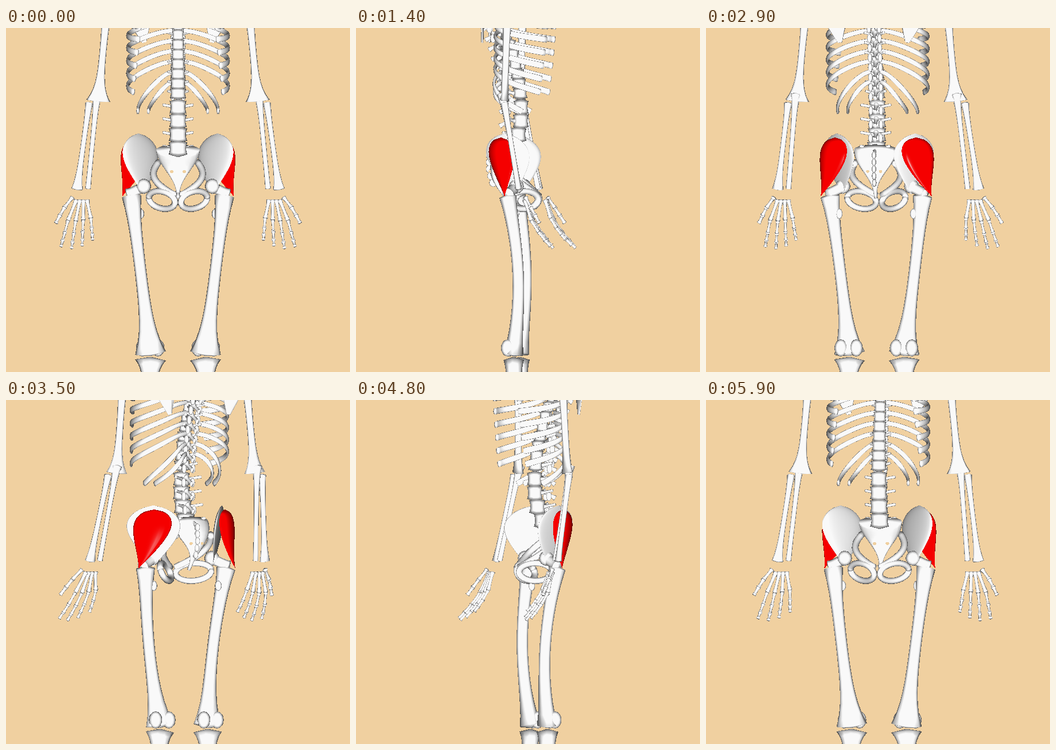
These frames come from a looping animation (600x600 px, 6000 ms). An HTML page with a canvas:

```html
<!DOCTYPE html>
<html lang="en">
<head>
<meta charset="utf-8">
<title>Rotating skeleton</title>
<style>
  html, body { margin: 0; width: 100%; height: 100%; overflow: hidden; background: #f0d0a0; }
  canvas { display: block; }
</style>
</head>
<body>
<canvas id="stage" width="600" height="600"></canvas>
<script>
const SIZE = 600, BONE = 0, MUSCLE = 1, HOLE = 2;
const Y = [0, 1, 0], Z = [0, 0, 1];
const { PI, sin, cos, min, max, abs } = Math;
const verts = [], tris = [];
let side = 1; // x is measured from the turning axis and mirrored for the other half

const add = (a, b, k = 1) => [a[0] + b[0] * k, a[1] + b[1] * k, a[2] + b[2] * k];
const cross = (a, b) => [a[1] * b[2] - a[2] * b[1], a[2] * b[0] - a[0] * b[2], a[0] * b[1] - a[1] * b[0]];
const unit = a => { const l = Math.hypot(...a) || 1; return a.map(v => v / l); };
const mix = (a, b, t) => a + (b - a) * t;
const mix3 = (a, b, t) => a.map((v, i) => mix(v, b[i], t));
const steps = (n, f) => Array.from({ length: n + 1 }, (_, i) => f(i / n));
const ring = (n, f) => Array.from({ length: n }, (_, i) => f(cos(i / n * 2 * PI), sin(i / n * 2 * PI)));

// Joins closed rings into a smooth surface
function skin(rings, kind = BONE) {
  const n = rings[0].length, m = rings.length, base = verts.length;
  rings.forEach((r, i) => r.forEach((p, j) => {
    const along = add(rings[min(i + 1, m - 1)][j], rings[max(i - 1, 0)][j], -1);
    const around = add(r[(j + 1) % n], r[(j + n - 1) % n], -1);
    const [nx, ny, nz] = unit(cross(along, around));
    verts.push({ x: p[0] * side, y: p[1], z: p[2], nx: nx * side, ny, nz });
  }));
  for (let i = 0; i < m - 1; i++) for (let j = 0; j < n; j++) {
    const a = base + i * n + j, b = base + i * n + (j + 1) % n;
    tris.push([a, b, a + n, kind], [b, b + n, a + n, kind]);
  }
}

// Each point holds x, y, z and two radii
function tube(pts, ref = Z, n = 12) {
  const last = pts.length - 1;
  const dir = pts.map((p, i) => unit(add(pts[min(i + 1, last)], pts[max(i - 1, 0)], -1)));
  const rings = pts.map((p, i) => {
    const u = unit(cross(dir[i], ref)), w = cross(u, dir[i]);
    return ring(n, (c, s) => add(add(p, u, p[3] * c), w, p[4] * s));
  });
  const cap = (i, sign) => {
    const p = pts[i], tip = add(p, dir[i], sign * .3 * min(p[3], p[4]));
    return rings[i].map(q => add(tip, add(q, p, -1), .05));
  };
  skin([cap(0, -1), ...rings, cap(last, 1)]);
}

// A shaft of radius r that flares towards both ends and bows forward
function bone(a, b, r, startR, endR, bow = 0) {
  const pair = v => [v, v].flat().slice(0, 2);
  const [s, e] = [startR, endR].map(v => Array.isArray(v) ? v : pair(v));
  tube(steps(14, t => {
    const radius = i => r + (s[i] - r) * (1 - t) ** 7 + (e[i] - r) * t ** 7;
    const [x, y, z] = mix3(a, b, t);
    return [x, y, z + bow * sin(PI * t), radius(0), radius(1)];
  }));
}

const chain = (points, r) =>
  points.slice(1).forEach((q, i) => bone(mix3(points[i], q, .04), mix3(points[i], q, .96), r * .58, r, r * .9));

function blob(x, y, z, rx, ry, rz, kind) {
  skin(steps(8, t => {
    const a = mix(-1.55, 1.55, t), k = cos(a);
    return ring(12, (c, s) => [x + rx * k * c, y + ry * sin(a), z + rz * k * s]);
  }), kind);
}

// A leaf-shaped plate, widest near the top; angle turns its width from x towards z
function petal({ top, bottom, skew, half, center, angle, outer, inner, kind }) {
  const dx = cos(angle), dz = sin(angle);
  skin(steps(28, t => {
    const w = max(.02, sin(PI * t ** skew)), [cx, cz] = center(t);
    return ring(24, (c, s) => {
      const along = half * w * c, out = s * w * (s > 0 ? outer : inner);
      return [cx + along * dx + out * dz, mix(top, bottom, t), cz + along * dz - out * dx];
    });
  }), kind);
}

const spineZ = y => -12 - (y - 150) ** 2 * (y > 150 ? .004 : .00133);

function spine() {
  for (let i = 0, y = 210; i < 12; i++) {
    const lumbar = i < 4, gap = lumbar ? 24 : 17, z = spineZ(y), w = 16.5 - i * .6;
    tube(steps(6, t => {
      const r = w * (1 - .14 * sin(PI * t));
      return [0, y + gap * .88 * (t - .5), z, r, r * .9];
    }));
    bone([0, y - 3, z - 16], [0, y + 9, z - 37], 3, [5, 6], [3, 5]);
    for (side of [1, -1]) {
      bone([5, y, z - 11], [lumbar ? 26 : 17, y - 4, z - 24], 2.5, 4, 2.5);
      blob(9, y + 6, z - 23, 4, 8, 5);
    }
    side = 1;
    y -= gap;
  }
  // sacrum, its crest and openings
  tube(steps(14, t => {
    const w = 3 + 35 * (1 - t * t) ** 3;
    return [0, mix(212, 296, t), -38 - 20 * sin(PI * t), w, 2 + w * .33];
  }), Z, 20);
  for (let y = 222; y < 275; y += 12) blob(0, y, -67 + max(0, y - 250) * .3, 4, 7, 7);
  for (const x of [-11, 11]) blob(x, 250, -57, 4, 3.5, 12, HOLE);
}

function rib(top, fall, reach, sweep) {
  tube(steps(20, t => {
    const a = sweep * t;
    return [10 + reach * sin(a) ** .7, top + fall * t + 6 * sin(PI * t),
      -5 - 58 * cos(a) + 18 * (1 - t) ** 6, 2.6, 4 + 1.6 * t * reach / 78];
  }), Y);
}

function chest() {
  for (let k = 0; k < 7; k++) rib(58 - 18 * k, 54 - 5 * k, 78, 2.2 + .06 * k);
  rib(76, 70, 60, 1.6);
  rib(94, 52, 42, 1.5);
  tube([[66, -12, -72, 20, 2], [59, 25, -74, 4, 2]]); // shoulder blade tip
}

function arm() {
  bone([125, -20, -23], [139, 127, -27], 6, 9, [21, 8]);
  bone([155, 131, -25], [176, 281, 2], 4.5, 7, [10, 6]);
  bone([141, 115, -31], [157, 280, 1], 4.2, 9, 5);
  const curl = y => 13 + 49 * max(0, (y - 298) / 84) ** 1.7;
  for (let i = 0; i < 4; i++) {
    const arch = sin(i * .75), knuckle = [152 + 13.3 * i, 332 + 5 * arch], tip = [149 + 18.3 * i, 369 + 15 * arch];
    const joints = [0, .45, .77, 1].map(t => {
      const [x, y] = mix3(knuckle, tip, t);
      return [x, y, curl(y)];
    });
    chain([[159 + 6 * i, 299, 13], joints[0]], 4.8);
    chain(joints, 3.8);
  }
  chain([0, .4, .7, 1].map(t => [184 + 29 * t ** .8, 295 + 45 * t, 15 + 27 * t]), 4.5);
}

function leg() {
  bone([81, 294, -27], [48, 567, -20], 10, [17, 15], [27, 17], 13);
  bone([86, 290, -26], [60, 277, -15], 9, 11, 11);
  blob(60, 276, -14, 13, 13, 13);
  blob(65, 324, -28, 6, 9, 6);
  for (const x of [35, 62]) blob(x, 558, -29, 11.5, 15, 12);
  bone([48, 579, -20], [52, 690, -18], 13, [27, 18], 13);
}

function hip() {
  petal({ top: 184, bottom: 290, skew: .64, half: 51, angle: .93, outer: 4, inner: 6,
    center: t => [69 - 9 * t, -34 + 16 * t] });
  petal({ top: 191, bottom: 293, skew: .54, half: 34, angle: .76, outer: 14, inner: 1,
    center: t => [71 + 26 * t * t, -40 + 9 * t], kind: MUSCLE });
  // pelvic brim, then the ring below it
  tube(steps(12, t => [mix(34, 5, t * t) + 14 * sin(PI * t), mix(234, 292, t), mix(-56, 18, t), 6, 6]), Y);
  tube(steps(24, t => {
    const c = cos(2 * PI * t), s = sin(2 * PI * t);
    return [28 + 23 * c, 300 - 4 * c + 15 * s, -5 - 22 * c - 8 * s, 5.5, 6];
  }), Z);
}

const ctx = document.getElementById("stage").getContext("2d");
const image = ctx.createImageData(SIZE, SIZE);
const pixels = new Uint32Array(image.data.buffer), depth = new Float32Array(SIZE * SIZE);
const rgb = (r, g, b) => (255 << 24 | b << 16 | g << 8 | r) >>> 0;
const BACK = rgb(240, 208, 160);

function shade(kind, facing, tilt) {
  if (kind === HOLE) return BACK;
  if (kind === BONE) {
    const v = min(249, 45 + 270 * facing);
    return rgb(v, v, v);
  }
  const shine = min(230, 240 * max(0, .954 * facing + .3 * tilt) ** 90);
  return rgb(min(245, 60 + 300 * facing), shine, shine);
}

function fill([ia, ib, ic, kind]) {
  const a = verts[ia], b = verts[ib], c = verts[ic];
  const area = (b.px - a.px) * (c.y - a.y) - (b.y - a.y) * (c.px - a.px);
  if (abs(area) < 1e-6) return;
  const from = (...v) => max(0, Math.ceil(min(...v) - .5)), to = (...v) => min(SIZE - 1, Math.floor(max(...v) - .5));
  const x0 = from(a.px, b.px, c.px), x1 = to(a.px, b.px, c.px);
  const y0 = from(a.y, b.y, c.y), y1 = to(a.y, b.y, c.y);
  for (let y = y0; y <= y1; y++) for (let x = x0; x <= x1; x++) {
    const dx = x + .5 - a.px, dy = y + .5 - a.y;
    const v = (dx * (c.y - a.y) - dy * (c.px - a.px)) / area;
    const w = (dy * (b.px - a.px) - dx * (b.y - a.y)) / area;
    const u = 1 - v - w;
    if (u < 0 || v < 0 || w < 0) continue;
    const z = u * a.pz + v * b.pz + w * c.pz, i = y * SIZE + x;
    if (z <= depth[i]) continue;
    depth[i] = z;
    pixels[i] = shade(kind, u * a.facing + v * b.facing + w * c.facing, u * a.tilt + v * b.tilt + w * c.tilt);
  }
}

function render(angle) {
  const c = cos(angle), s = sin(angle);
  for (const v of verts) {
    v.px = SIZE / 2 + v.x * c + v.z * s;
    v.pz = v.z * c - v.x * s;
    const nz = v.nz * c - v.nx * s;
    v.facing = abs(nz);
    v.tilt = nz < 0 ? -v.ny : v.ny;
  }
  pixels.fill(BACK);
  depth.fill(-1e9);
  tris.forEach(fill);
  ctx.putImageData(image, 0, 0);
}

spine();
for (side of [1, -1]) { chest(); arm(); hip(); leg(); }

// A full turn in 60 steps of 100 ms
let shown = -1;
function tick() {
  const step = Math.floor(performance.now() / 100) % 60;
  if (step !== shown) render((shown = step) * PI / 30);
  requestAnimationFrame(tick);
}
tick();
</script>
</body>
</html>
```
